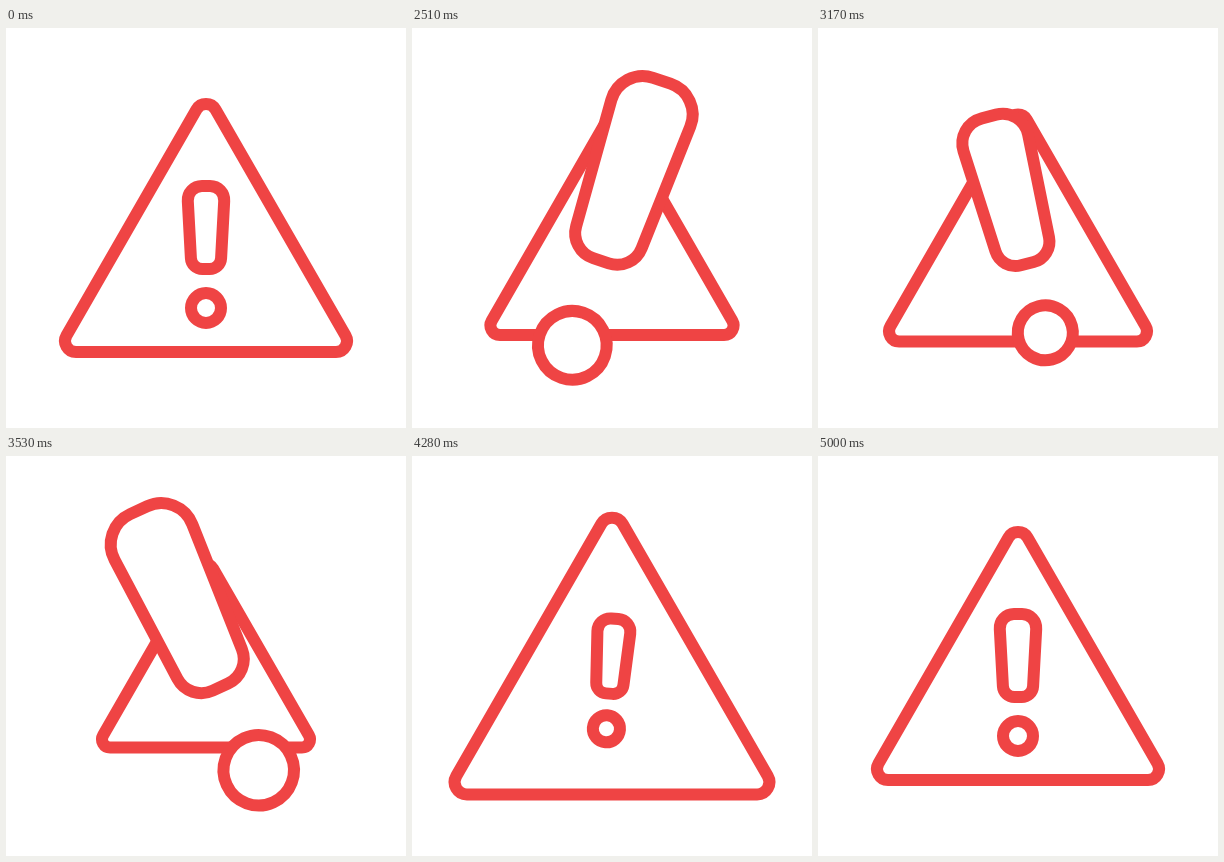
Write an HTML page that moves like this. It is 400 by 400 pixels and loops after 5.03 s.

```html
<!DOCTYPE html>
<html lang="en">
<head>
<meta charset="utf-8">
<title>Warning sign</title>
<style>
  html, body { margin: 0; width: 100%; height: 100%; overflow: hidden; background: #fff; }
  svg { display: block; width: 100vw; height: 100vh; }
  path, circle { fill: #fff; stroke: #ef4444; stroke-width: 12; stroke-linejoin: round; vector-effect: non-scaling-stroke; }
</style>
</head>
<body>
<svg viewBox="-200 -200 400 400">
  <path id="triangle" d="M-130 124A11 11 0 0 1-139.5 107.5L-9.5-118.5A11 11 0 0 1 9.5-118.5L139.5 107.5A11 11 0 0 1 130 124Z"/>
  <g id="mark">
    <path d="M-4-68.5H4A14.2 14.2 0 0 1 18.2-53.5L15.1 3.6A11.5 11.5 0 0 1 3.6 14.5H-3.6A11.5 11.5 0 0 1-15.1 3.6L-18.2-53.5A14.2 14.2 0 0 1-4-68.5Z"/>
    <circle cy="53.5" r="15"/>
  </g>
</svg>
<script>
const LOOP = 5030, STEP = 30;
const WAKE = 2000, SETTLE = 5000, BEAT = 600;
const triangle = document.getElementById('triangle');
const mark = document.getElementById('mark');

// The sign swings from pose to pose, one turn per beat.
const pose = (tilt, markScale, triangleScale) => ({ tilt, markScale, triangleScale });
const rest = pose(0, 1, 1);
const poses = [
  rest,
  pose(21.4, 2.34, .854),
  pose(-12.2, 1.71, .957),
  pose(-25.2, 2.37, .73),
  pose(4.6, .9, 1.122),
  pose(0, 1, .99),
  rest
];

const clamp = (x, low, high) => Math.min(high, Math.max(low, x));
const easeSine = p => (1 - Math.cos(Math.PI * p)) / 2;
const turnTime = i => clamp(1800 + BEAT * i, WAKE, SETTLE);

function poseAt(time) {
  const i = clamp(Math.floor((time - 1800) / BEAT), 0, poses.length - 2);
  const from = turnTime(i), to = turnTime(i + 1);
  const p = easeSine(clamp((time - from) / (to - from), 0, 1));
  const mix = key => poses[i][key] + (poses[i + 1][key] - poses[i][key]) * p;
  return pose(mix('tilt'), mix('markScale'), mix('triangleScale'));
}

function draw(ms) {
  const time = Math.floor((ms % LOOP - WAKE) / STEP) * STEP + WAKE;
  const { tilt, markScale, triangleScale } = poseAt(time);
  // The mark slides towards the centre as its size leaves the resting size.
  const offset = 26.5 - 19.5 * Math.abs(markScale - 1);
  triangle.setAttribute('transform', `scale(${triangleScale})`);
  mark.setAttribute('transform', `rotate(${tilt}) translate(0 ${offset}) scale(${markScale})`);
}

const begin = performance.now();
function tick() {
  draw(performance.now() - begin);
  requestAnimationFrame(tick);
}
tick();
</script>
</body>
</html>
```
